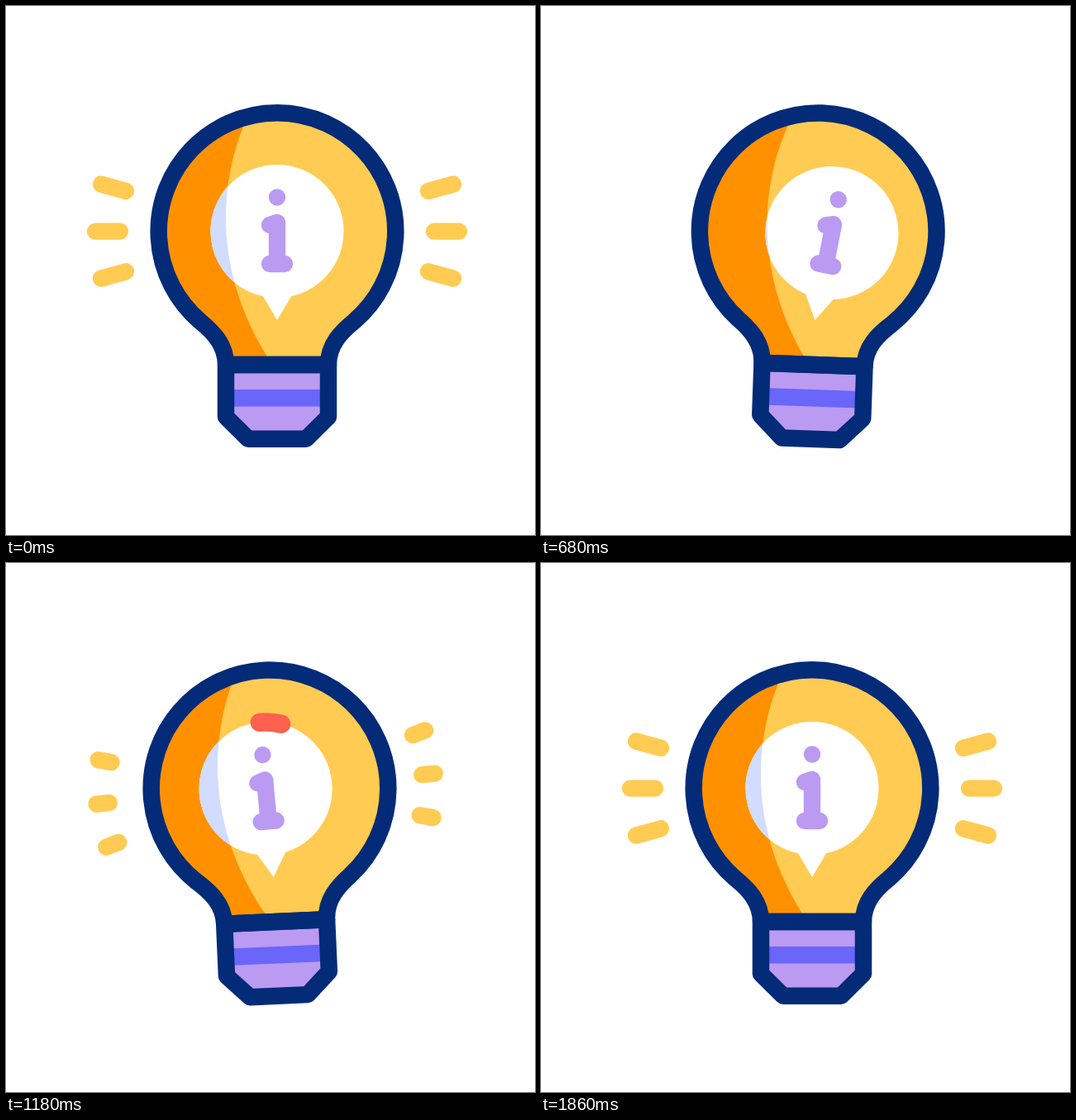
Animation of 640 by 640 pixels, one loop 1.88 s. Source, as an HTML page:

```html
<!DOCTYPE html>
<html>
<head>
<meta charset="utf-8">
<title>Info bulb</title>
<style>
  html, body { margin: 0; width: 100%; height: 100%; overflow: hidden; background: #fff; }
  svg { display: block; width: 100%; height: 100%; }
  .line { fill: none; stroke-linecap: round; stroke-linejoin: round; }
</style>
</head>
<body>
<svg viewBox="0 0 640 640">
  <defs>
    <path id="glass" d="M266 434C266 410 251 394.6 235 381.6A143.3 143.3 0 1 1 421 381.6C405 394.6 390 410 390 434Z"/>
    <path id="base" d="M266 434V497L293 523.7H363L390 497V434Z"/>
    <path id="balloon" d="M328 192A80.5 80.5 0 0 1 345 351.2L328 380L311 351.2A80.5 80.5 0 0 1 328 192"/>
    <path id="shade" d="M290 138L287 146C260 213 249 316 316 424L320 434H150V120Z"/>
    <clipPath id="inGlass"><use href="#glass"/></clipPath>
    <clipPath id="inShade"><use href="#shade"/></clipPath>
  </defs>
  <g id="bulb">
    <use href="#glass" fill="#ffcb52"/>
    <use href="#shade" fill="#ff9100" clip-path="url(#inGlass)"/>
    <use href="#base" fill="#bb9af2"/>
    <path d="M270 464H386V484.5H270Z" fill="#6966f9"/>
    <use class="tilt" href="#balloon" fill="#fff"/>
    <g clip-path="url(#inShade)"><use class="tilt" href="#balloon" fill="#d1dcff"/></g>
    <g class="line" stroke="#032b78" stroke-width="20.5">
      <use href="#glass"/>
      <use href="#base"/>
    </g>
    <g class="tilt">
      <circle cx="328" cy="231.5" r="10.2" fill="#bb9af2"/>
      <path class="line" stroke="#bb9af2" stroke-width="20.4" d="M319 265L328 262V312M319 312H337"/>
      <g id="rays" class="line" stroke="#ffcb52" stroke-width="20.4"></g>
      <path id="trace" class="line" stroke="#ff614f" stroke-width="22.5" pathLength="1"/>
    </g>
  </g>
</svg>
<script>
const LOOP = 1880;
const $ = id => document.getElementById(id);
const bulb = $('bulb'), trace = $('trace');
const tilted = document.querySelectorAll('.tilt');
trace.setAttribute('d', $('balloon').getAttribute('d'));

// Each ray runs from its inner end to its outer end.
const rays = [];
for (const side of [-1, 1]) {
  for (const [x, y, dy] of [[183, -48.7, -8.3], [190, 0, 0], [183, 48.7, 8.3]]) {
    const ray = document.createElementNS('http://www.w3.org/2000/svg', 'path');
    ray.setAttribute('d', `M${328 + side * x} ${272.6 + y}l${side * 30} ${dy}`);
    ray.setAttribute('pathLength', 1);
    $('rays').append(ray);
    rays.push(ray);
  }
}

// Smooth curve through [time, value] keys, level at every extreme.
function curve(keys) {
  const rate = i => (keys[i + 1][1] - keys[i][1]) / (keys[i + 1][0] - keys[i][0]);
  const slopes = keys.map((_, i) => {
    if (!i || i === keys.length - 1) return 0;
    const a = rate(i - 1), b = rate(i);
    return a * b > 0 ? 2 * a * b / (a + b) : 0;
  });
  return t => {
    const i = keys.findIndex(k => k[0] > t) - 1;
    if (i < 0) return keys[keys.length - 1][1];
    const [t0, v0] = keys[i], [t1, v1] = keys[i + 1];
    const d = t1 - t0, u = (t - t0) / d, w = 1 - u;
    return v0 * w * w * (1 + 2 * u) + v1 * u * u * (3 - 2 * u)
      + d * u * w * (slopes[i] * w - slopes[i + 1] * u);
  };
}

const swing = curve([[0, 0], [240, 3.25], [420, 7.5], [530, 12], [680, 2.1],
  [870, -12], [1000, -7.8], [1080, -5], [1200, -2.2], [1380, 0]]);
const sway = curve([[0, 0], [240, 2.1], [420, 5.9], [610, 10.3], [680, 9],
  [925, -9.8], [1000, -7.7], [1100, -4.3], [1220, -2], [1400, 0]]);

function ease(t, from, to) {
  const u = Math.min(1, Math.max(0, (t - from) / (to - from)));
  return u * u * (3 - 2 * u);
}

function trim(el, a, b) {
  el.style.display = b - a > 0.001 ? '' : 'none';
  el.style.strokeDasharray = `${b - a} 3`;
  el.style.strokeDashoffset = -a;
}

function draw(now) {
  const t = now % LOOP;
  bulb.setAttribute('transform', `rotate(${swing(t)} 328.2 476)`);
  for (const el of tilted) el.setAttribute('transform', `rotate(${sway(t)} 328 380)`);
  for (const ray of rays) {
    if (t < 700) trim(ray, ease(t, 0, 310), 1);
    else trim(ray, 0, ease(t, 1005, 1350));
  }
  trim(trace, ease(t, 1300, 1860), ease(t, 1106, 1666));
}

const start = performance.now();
function tick() {
  draw(performance.now() - start);
  requestAnimationFrame(tick);
}
tick();
</script>
</body>
</html>
```
